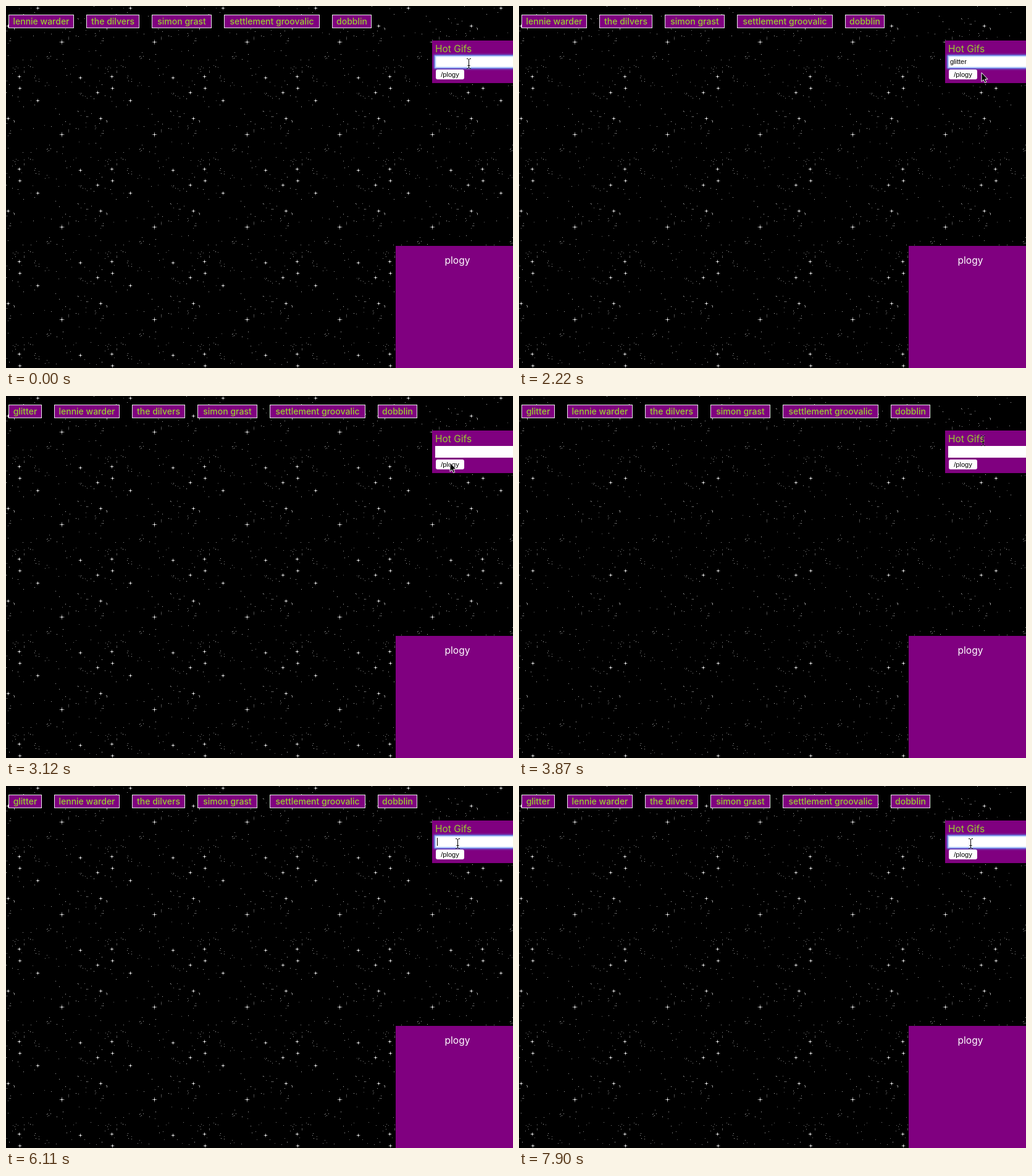
An HTML page with a canvas for the animation above (8 s loop, 821 px wide and 587 px high).

```html
<!DOCTYPE html>
<html>
<head>
<meta charset="utf-8">
<style>
html, body { margin: 0; width: 100%; height: 100%; overflow: hidden; background: #000; }
body { position: relative; font: 15.5px/20px Inter, "Open Sans", sans-serif; }
body * { position: absolute; box-sizing: border-box; white-space: pre; }
#sky { left: 0; top: 0; }
.tag { top: 14px; height: 22px; border: 1px solid #eee; background: #800080; color: #9acd32;
  font-size: 14px; font-weight: 500; line-height: 20px; text-align: center; }
#search { left: 690px; top: 56px; width: 140px; height: 69px; background: #800080; color: #9acd32; }
#title { left: 5px; top: 4px; }
#field { left: 5px; top: 25px; width: 150px; height: 19px; background: #fff; color: #000;
  font: 11px/19px "Liberation Sans", Arial, sans-serif; padding-left: 3px; }
#field.focus { box-shadow: 0 0 0 1px #86a4f2, 0 0 3px 2px #5b8cf0, inset 0 0 2px 1px #a9c1f7; }
#caret { top: 3px; width: 1px; height: 13px; background: #000; }
#button { left: 6px; top: 47px; width: 46px; height: 16px; border-radius: 3px; background: #fff;
  color: #000; font: 11px/16px "Liberation Sans", Arial, sans-serif; text-align: center; }
#results { left: 631px; top: 389px; width: 200px; height: 198px; background: #800080; color: #fff;
  text-align: center; padding-top: 14px; }
#beam, #arrow { left: 0; top: 0; overflow: visible; }
</style>
</head>
<body>
<canvas id="sky" width="821" height="587"></canvas>
<div id="tags"></div>
<div id="search">
  <div id="title">Hot Gifs</div>
  <div id="field"><span id="word"></span><i id="caret"></i></div>
  <div id="button">/plogy</div>
</div>
<div id="results">plogy</div>
<svg id="beam" width="1" height="1"><path d="M-3-7.5h2l1.5 1.5 1.5-1.5h2M.5-6V7M-3 8.5h2L.5 7 2 8.5h2M-1.5 3.5h4" fill="none" stroke="#fff" stroke-opacity=".35" stroke-width="2"/><path d="M-3-7.5h2l1.5 1.5 1.5-1.5h2M.5-6V7M-3 8.5h2L.5 7 2 8.5h2M-1.5 3.5h4" fill="none" stroke="#000"/></svg>
<svg id="arrow" width="1" height="1"><path d="M0 0V14.5L3.2 11.5 5.4 16.5 7.8 15.5 5.7 10.7H10Z" fill="#000" stroke="#fff"/></svg>
<script>
const $ = id => document.getElementById(id);
const LOOP = 8000, TILE = 150;

// Bright stars: x, y, arm length, first phase in which they shine
const bright = [
  [148, 140, 3, 0], [22, 133, 3, 1], [21, 114, 3, 2], [90, 58, 4, 2],
  [3, 32, 3, 3], [51, 3, 3, 4], [120, 116, 3, 4]
];
const clusters = [125, 23, 98, 50, 5, 45, 35, 92, 75, 82, 127, 140, 62, 128, 12, 102, 105, 104];

let seed = 41;
const rand = () => (seed = seed * 16807 % 2147483647) / 2147483647;
const wrap = v => (Math.floor(v) + TILE) % TILE;
const dots = [];
const addDot = (x, y) => dots.push([wrap(x), wrap(y), 95 + Math.floor(rand() * 105)]);
for (let i = 0; i < clusters.length; i += 2)
  for (let k = 0; k < 5; k++)
    addDot(clusters[i] + rand() * 18 - 9, clusters[i + 1] + rand() * 20 - 10);
for (let i = 0; i < 58; i++) addDot(rand() * TILE, rand() * TILE);

const ctx = $("sky").getContext("2d");

function makeTile(phase) {
  const tile = document.createElement("canvas");
  tile.width = tile.height = TILE;
  const g = tile.getContext("2d");
  const px = (x, y, v) => {
    g.fillStyle = `rgb(${v},${v},${v})`;
    g.fillRect(wrap(x), wrap(y), 1, 1);
  };
  dots.forEach(d => px(...d));
  for (const [x, y, arm, from] of bright) {
    if (phase < from) continue;
    px(x, y, 255);
    for (let r = 1; r <= arm; r++) {
      const v = Math.round(225 - 165 * (r - 1) / (arm - 1));
      px(x + r, y, v); px(x - r, y, v); px(x, y + r, v); px(x, y - r, v);
    }
  }
  return ctx.createPattern(tile, "repeat");
}
const skies = [0, 1, 2, 3, 4, 5].map(makeTile);
const twinkles = [450, 890, 1330, 1920, 2370, 2970, 3420, 3870, 4470, 4910, 5360, 5960, 6410, 6860, 7450, 7900];

// Tag label and box width
const names = [["glitter", 54], ["lennie warder", 106], ["the dilvers", 86], ["simon grast", 97],
  ["settlement groovalic", 155], ["dobblin", 64]];
const tags = names.map(([text, width]) => {
  const el = document.createElement("div");
  el.className = "tag";
  el.textContent = text;
  el.style.width = width + "px";
  $("tags").append(el);
  return el;
});

const typing = [[0, 0], [450, 1], [590, 2], [890, 4], [1030, 5], [1330, 6], [1470, 7], [2970, 0]];
const carets = [[0, 0], [450, 1], [1920, 0], [6110, 1], [6410, 0], [6860, 1], [7000, 0], [7450, 1], [7900, 0]];
// Time, pointer shape, x, y
const pointer = [
  [0, "beam", 749, 93], [450, "", 0, 0], [1920, "beam", 749, 94], [2070, "arrow", 749, 103],
  [2220, "arrow", 749, 108], [2370, "arrow", 738, 109], [2520, "arrow", 725, 109],
  [2670, "arrow", 719, 108], [3270, "arrow", 733, 92], [3420, "beam", 751, 72],
  [5360, "beam", 747, 74], [5660, "beam", 742, 80], [5810, "beam", 735, 89], [5960, "beam", 731, 93]
];
const at = (track, t) => track.filter(step => step[0] <= t).pop();

let lastPhase = -1;
function draw(t) {
  const phase = (5 + twinkles.filter(time => time <= t).length) % 6;
  if (phase !== lastPhase) {
    ctx.clearRect(0, 0, 821, 587);
    ctx.fillStyle = skies[phase];
    ctx.fillRect(0, 0, 821, 587);
    lastPhase = phase;
  }

  const added = t >= 2970;
  let x = 4;
  tags.forEach((el, i) => {
    const shown = i > 0 || added;
    el.style.display = shown ? "" : "none";
    el.style.left = x + "px";
    if (shown) x += names[i][1] + 20;
  });

  $("word").textContent = "glitter".slice(0, at(typing, t)[1]);
  $("field").className = t < 2820 || t >= 6110 ? "focus" : "";
  $("caret").style.display = at(carets, t)[1] ? "" : "none";
  $("caret").style.left = 3 + $("word").offsetWidth + "px";

  const [, shape, px, py] = at(pointer, t);
  for (const id of ["beam", "arrow"]) {
    $(id).style.display = id === shape ? "" : "none";
    $(id).style.transform = `translate(${px}px, ${py}px)`;
  }
}

const start = performance.now();
function tick() {
  draw((performance.now() - start) % LOOP);
  requestAnimationFrame(tick);
}
tick();
</script>
</body>
</html>
```
